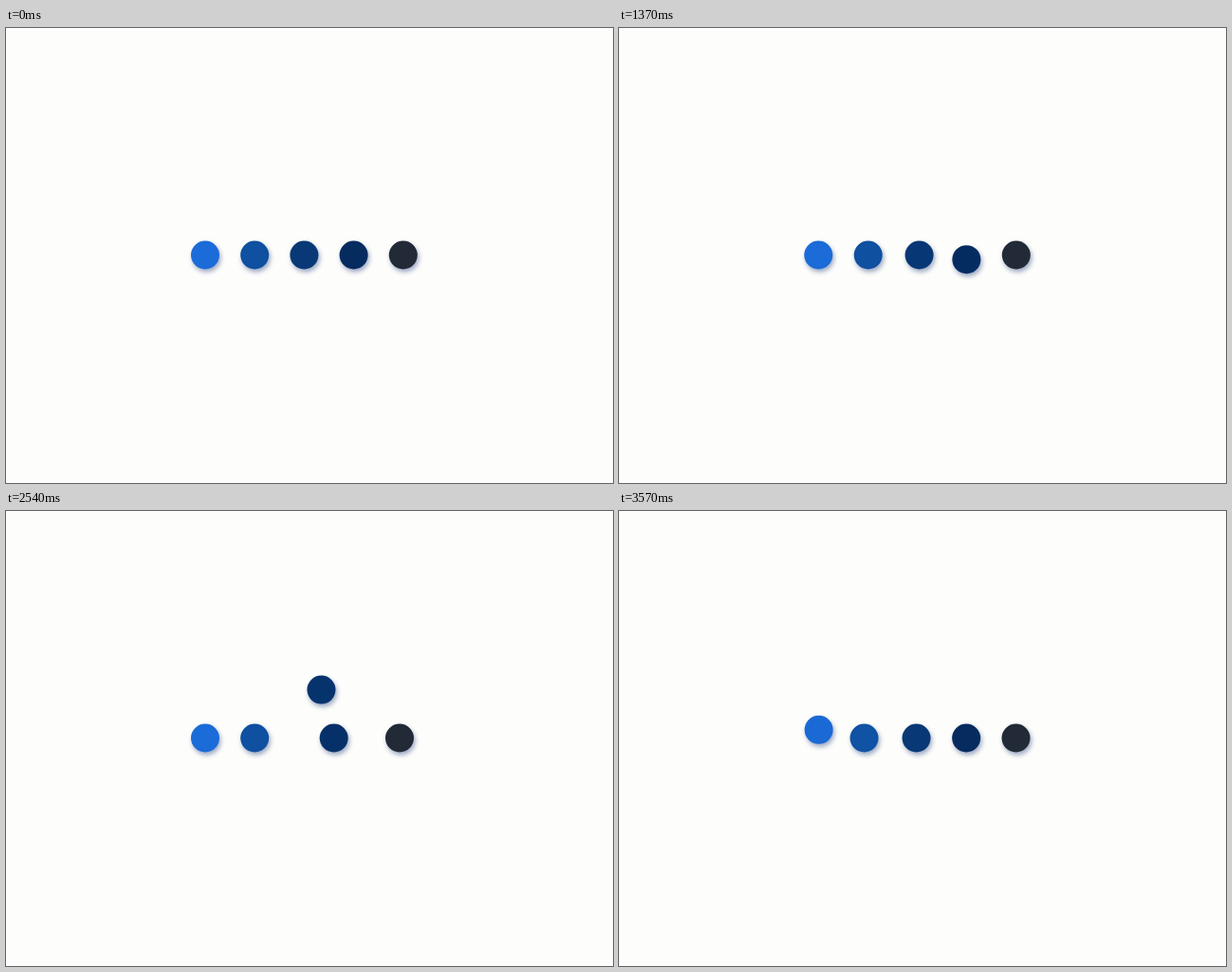
An HTML page with a canvas that plays this animation: 640 px wide and 480 px high, repeating every 3640 ms.

```html
<!DOCTYPE html>
<html lang="en">
<head>
<meta charset="utf-8">
<title>Hopping dots</title>
<style>
  html, body { margin: 0; width: 100%; height: 100%; overflow: hidden; background: #fdfdfb; }
  canvas { display: block; }
</style>
</head>
<body>
<canvas id="stage" width="640" height="480"></canvas>
<script>
const ctx = document.getElementById("stage").getContext("2d");

// Steps last 68.75 ms, with each change rounded to 10 ms.
const LOOP = 3640, STEP = 68.75, ROUNDING = 5, START = 66, HOP = 442.5;
const LEFT = 210, GAP = 52.2, BASE = 239.5, RADIUS = 15, LIFT = 54;
const COLORS = [[27, 107, 216], [15, 80, 160], [8, 56, 118], [5, 43, 95], [33, 42, 54]];

const lerp = (a, b, k) => a + (b - a) * k;
const slotX = slot => LEFT + slot * GAP;
const mix = (from, to, k) =>
  `rgb(${COLORS[from].map((c, i) => Math.round(lerp(c, COLORS[to][i], k)))})`;

function ball(x, y, color) {
  ctx.shadowColor = "rgba(10, 40, 110, 0.4)";
  ctx.shadowBlur = 5;
  ctx.shadowOffsetX = 1.5;
  ctx.shadowOffsetY = 3;
  ctx.fillStyle = color;
  ctx.beginPath();
  ctx.arc(x, y, RADIUS, 0, Math.PI * 2);
  ctx.fill();
}

function draw(time) {
  ctx.shadowColor = "transparent";
  ctx.fillStyle = "#fdfdfb";
  ctx.fillRect(0, 0, 640, 480);

  // Four hops to the right, then four back.
  const phase = Math.min(Math.max((time - START) / HOP, 0), 7.99999);
  const hop = Math.floor(phase);
  const p = phase - hop;
  const dir = hop < 4 ? 1 : -1;
  const from = hop < 4 ? hop : 8 - hop;
  const to = from + dir;
  const bump = Math.sin(Math.PI * p);

  for (let slot = 0; slot < 5; slot++) {
    if (slot === from || slot === to) continue;
    // Balls already passed lean slightly after the moving one.
    const behind = (from - slot) * dir;
    const lean = behind > 0 ? dir * 4 / behind * bump : 0;
    ball(slotX(slot) + lean, BASE, mix(slot, slot, 0));
  }

  ball(lerp(slotX(to), slotX(from), p), BASE, mix(to, from, p));

  const across = (1 - Math.cos(Math.PI * p)) / 2;
  const side = hop % 2 ? -1 : 1;
  ball(lerp(slotX(from), slotX(to), across),
       BASE + side * LIFT * Math.pow(bump, 1.2), mix(from, to, p));
}

const origin = performance.now();
function tick() {
  const time = (performance.now() - origin) % LOOP;
  draw(Math.floor((time + ROUNDING) / STEP) * STEP);
  requestAnimationFrame(tick);
}
tick();
</script>
</body>
</html>
```
